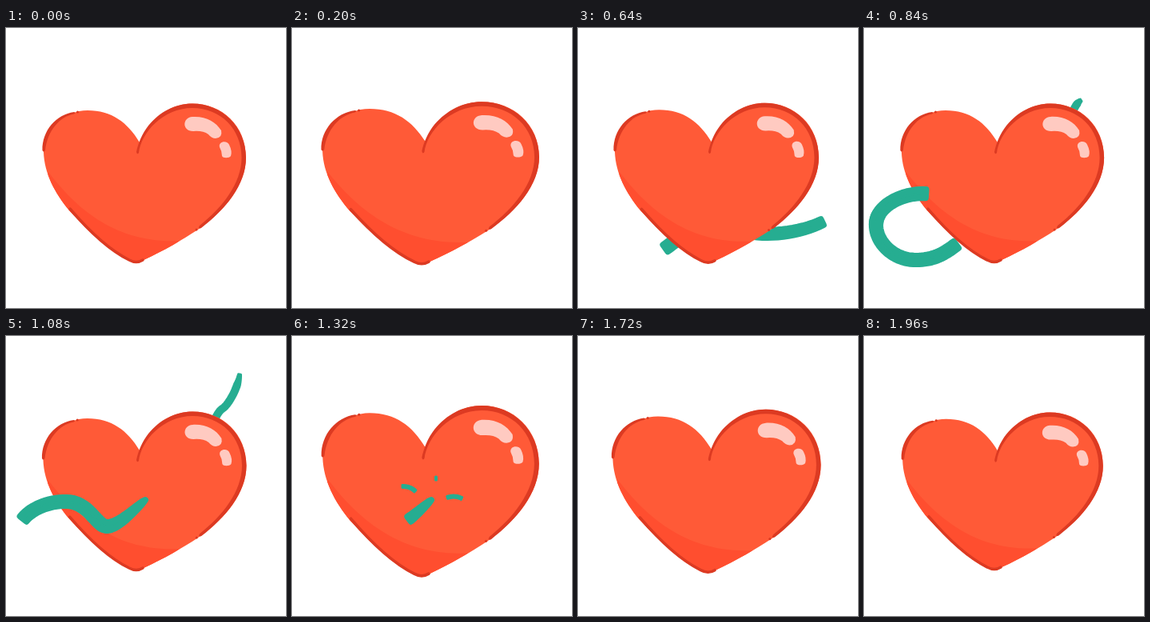
Animation, 350 px wide and 350 px high, one loop 2000 ms. Source, as an HTML page:

```html
<!DOCTYPE html>
<html lang="en">
<head>
<meta charset="utf-8">
<title>Beating heart</title>
<style>
  html, body { margin: 0; width: 100%; height: 100%; overflow: hidden; background: #fff; }
  svg { display: block; width: 100%; height: 100%; }
  .ribbon { fill: #26ad91; stroke: #26ad91; stroke-linejoin: round; }
  .line { fill: none; stroke: #dc3a22; stroke-linecap: round; }
  .dark { fill: #dc3a22; }
  .shine { fill: #ffcac1; }
</style>
</head>
<body>
<svg viewBox="0 0 350 350">
  <defs>
    <path id="body" d="M167 143C152 118 132 103 102 103C73 103 47 127 47 155C48 182 61 206 79 228C109 260 134 283 157 292Q164 295 172 290C198 278 220 265 240 252C274 228 300 196 300 162C300 122 270 94.500 233 94.500C200 94.500 176 120 167 143Z"/>
    <clipPath id="inside"><use href="#body"/></clipPath>
  </defs>
  <g id="back"></g>
  <g id="heart">
    <use href="#body" fill="#ff5a37"/>
    <path clip-path="url(#inside)" fill="#ff4e2f" d="M53 180C88 226 138 270 217 266L170 310L40 240Z"/>
    <path class="dark" d="M163 155C165 145 170 132 178 122C192 105 211 94.500 233 94.500C270 94.500 300 124 300 162C300 196 274 227 244 250Q239 252 242 247C270 225 294.500 194 294.500 162C294.500 126 268 100 233 100C196 100 169 131 166 156Q164 159 163 155Z"/>
    <path class="dark" d="M45.500 153C45 128 63 108 85 105Q88 106 85 107.500C67 111 52 128 49 153Q47 156 45.500 153Z"/>
    <path class="line" stroke-width="3.500" d="M80 226C103 253 130 278 154 290Q163 295 171 290"/>
    <circle class="dark" cx="89.500" cy="105" r="1.500"/>
    <circle class="dark" cx="238" cy="252" r="1.500"/>
    <path class="shine" d="M233 111C250 110 262 117 269 128Q271 137 262 138Q257 138 253 133Q246 128 234 129C220 129 220 112 233 111Z"/>
    <path class="shine" d="M267 149C265 141 277 140 279 146Q283 154 281 160C279 163 271 163 270 160Q270 154 267 149Z"/>
  </g>
  <g id="front"></g>
</svg>
<script>
const LOOP = 2000, BEAT = 1000;
const $ = id => document.getElementById(id);
const clamp = (x, max) => Math.max(0, Math.min(max, x));
const bell = (x, centre, width) => Math.exp(-(((x - centre) / width) ** 2));

// Smooth cubic curve: rows hold a control and an end point, the other control mirrors the last one.
function curve(start, control, ...rows) {
  return rows.map(([cx, cy, x, y]) => {
    const seg = [...start, ...control, cx, cy, x, y];
    start = [x, y];
    control = [2 * x - cx, 2 * y - cy];
    return seg;
  });
}

const vine = curve([303, 157], [331, 156],
  [346, 192, 333, 219],
  [260, 262, 220, 256],
  [144, 249, 123, 265],
  [90, 290, 64, 290],
  [15, 269, 15, 246],
  [47, 206, 76, 207],
  [113, 239, 127, 238],
  [160, 217, 174, 205]);
const sprout = curve([256, 113], [262, 104], [264, 95, 271, 90.5], [290, 65, 292, 48]);
const sparks = [
  curve([154, 194], [150, 190], [145, 188, 138, 188]),
  curve([194, 202], [200, 200], [206, 200, 212, 203]),
  curve([180, 180], [180, 179], [180, 177, 180, 176])
];

function pointAt(segs, u) {
  const i = Math.min(segs.length - 1, Math.floor(u));
  const p = segs[i], t = u - i, s = 1 - t;
  const pos = k => s*s*s*p[k] + 3*s*s*t*p[k + 2] + 3*s*t*t*p[k + 4] + t*t*t*p[k + 6];
  const vel = k => s*s*(p[k + 2] - p[k]) + 2*s*t*(p[k + 4] - p[k + 2]) + t*t*(p[k + 6] - p[k + 4]);
  const dx = vel(0), dy = vel(1), n = Math.hypot(dx, dy) || 1;
  return [pos(0), pos(1), -dy / n, dx / n];
}

// Outline of a band of varying width; r rounds its corners.
function ribbon(segs, tail, head, width, r) {
  if (head - tail < 0.01) return "";
  const left = [], right = [], steps = Math.ceil((head - tail) * 20) + 2;
  for (let i = 0; i <= steps; i++) {
    const u = tail + (head - tail) * i / steps;
    const [x, y, nx, ny] = pointAt(segs, u);
    const h = Math.max(0, width(u) / 2 - r);
    left.push(`${(x + nx * h).toFixed(2)} ${(y + ny * h).toFixed(2)}`);
    right.unshift(`${(x - nx * h).toFixed(2)} ${(y - ny * h).toFixed(2)}`);
  }
  return `<path class="ribbon" stroke-width="${2 * r}" d="M${left.concat(right).join("L")}Z"/>`;
}

const vineWidth = u => Math.min(11 + 3.5 * u, 18.2, 7 + 11 * Math.sqrt(8 - u));

// One strong swell, a recoil and a weaker echo; height swells after width.
function pulse(b, peak, gain) {
  return 1 + gain * bell(b, peak, 100) - 0.026 * bell(b, 525, 30)
    + 0.028 * bell(b, 720, 70) - 0.014 * bell(b, 930, 50);
}

function draw(t) {
  const b = t % BEAT;
  const scale = `${pulse(b, 260, 0.1)} ${pulse(b, 310, 0.076)}`;
  $("heart").setAttribute("transform",
    `translate(173 194.5) scale(${scale}) translate(-173 -194.5)`);

  const head = clamp((t - 408) / 72, 8), tail = clamp((t - 490) / 112, 8);
  const tip = clamp((t - 720) / 120, 2), root = clamp((t - 1080) / 100, 2);
  $("back").innerHTML =
    ribbon(vine, tail, Math.min(head, 5.2), vineWidth, 4) +
    ribbon(sprout, root, tip, u => Math.min(10, 6 + 16 * (tip - u)), 1.5);

  const from = clamp((t - 1320) / 100, 1), to = clamp((t - 1220) / 100, 1);
  $("front").innerHTML =
    ribbon(vine, Math.max(tail, 5), head, vineWidth, 4) +
    sparks.map((s, i) => ribbon(s, from, to, () => i < 2 ? 6 : 4, 1.5)).join("");
}

const start = performance.now();
function frame() {
  draw((performance.now() - start) % LOOP);
  requestAnimationFrame(frame);
}
frame();
</script>
</body>
</html>
```
